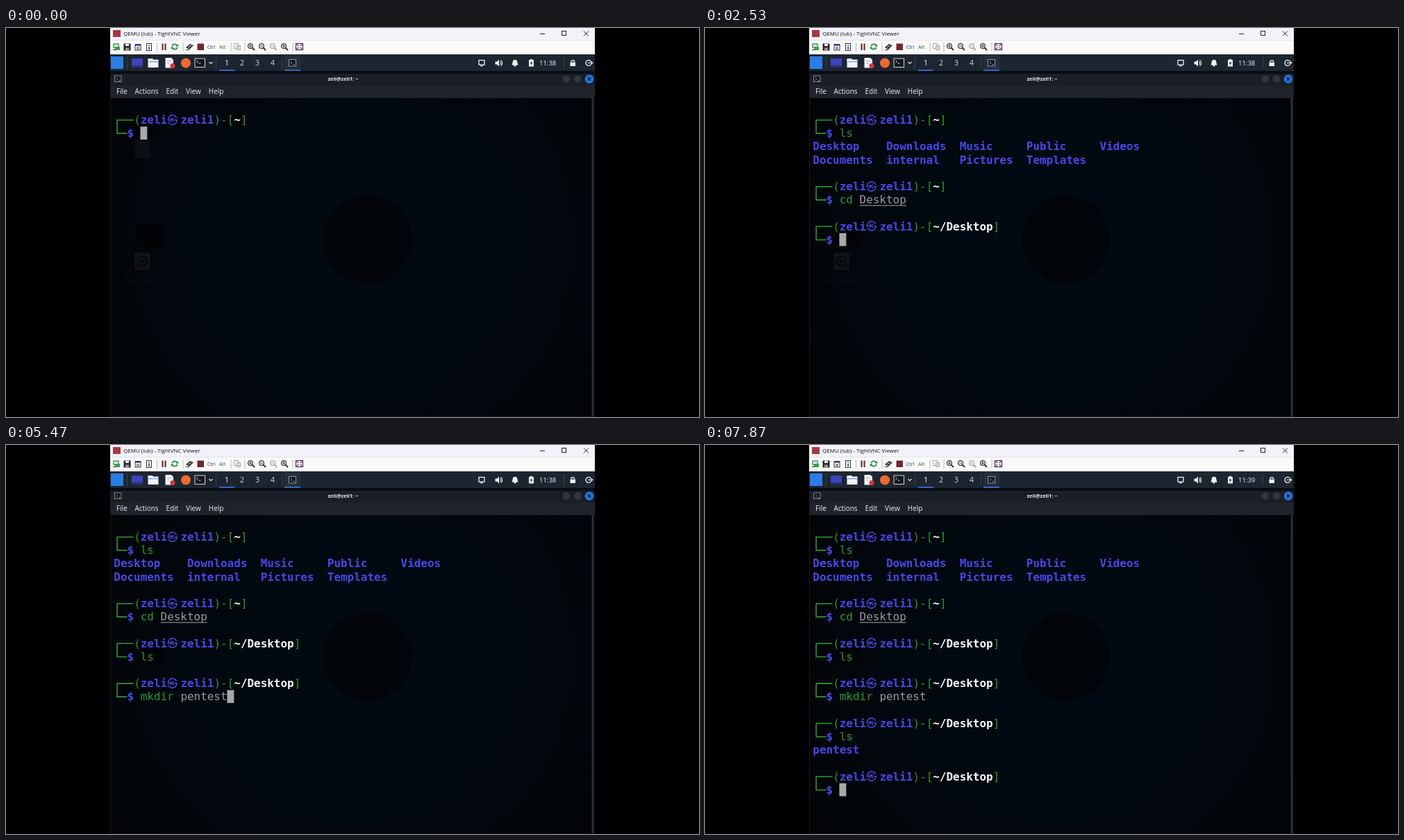
An HTML page with a canvas for the animation above (8000 ms loop, 998 px wide and 561 px high).

```html
<!DOCTYPE html>
<html lang="en">
<head>
<meta charset="utf-8">
<title>Terminal session</title>
<style>
html, body { margin: 0; width: 100%; height: 100%; overflow: hidden; background: #000; }
canvas { display: block; }
</style>
</head>
<body>
<canvas id="stage" width="998" height="561"></canvas>
<script>
const ctx = document.getElementById('stage').getContext('2d');
const LOOP = 8000;
const UI = '"Open Sans", "Noto Sans", sans-serif';
const MONO = '"DejaVu Sans Mono", monospace';
const CJK = '"Noto Sans CJK KR", "Noto Sans CJK JP", "Noto Sans CJK", sans-serif';
const USER = 'zeli', HOST = 'zeli1';

// Terminal grid
const X0 = 155.3, Y0 = 138, CELL = 9.61, ROW = 19.2;
const GREEN = '#2b9a30', BLUE = '#4a47ea', GRAY = '#979b9f', WHITE = '#fbfbfb', CURSOR = '#a6a8aa';

// Wallpaper glow seen through the terminal
const glow = ctx.createRadialGradient(500, 305, 120, 500, 305, 420);
glow.addColorStop(0, '#010a12');
glow.addColorStop(.5, '#01070d');
glow.addColorStop(1, '#020407');

// keys: typing times; accept: time the suggestion is taken; enter: time it runs
const session = [
  { dir: '~', cmd: 'ls', keys: [270, 400], enter: 600, out: [
    [[0, 'Desktop'], [11, 'Downloads'], [22, 'Music'], [32, 'Public'], [43, 'Videos']],
    [[0, 'Documents'], [11, 'internal'], [22, 'Pictures'], [32, 'Templates']]] },
  { dir: '~', cmd: 'cd Desktop', keys: [870, 1000, 1070, 1200], accept: 1600, enter: 2070, path: true, out: [] },
  { dir: '~/Desktop', cmd: 'ls', keys: [2800, 2930], enter: 3200, out: [] },
  { dir: '~/Desktop', cmd: 'mkdir pentest', keys: [4070, 4200, 4330, 4460, 4600, 4800, 4930], accept: 5270, enter: 5800, out: [] },
  { dir: '~/Desktop', cmd: 'ls', keys: [6730, 6870], enter: 7200, out: [[[0, 'pentest']]] },
  { dir: '~/Desktop', cmd: '', keys: [], enter: Infinity, out: [] }
];

function rect(x, y, w, h, color) {
  ctx.fillStyle = color;
  ctx.fillRect(x, y, w, h);
}
function frame(x, y, w, h, color, lw = 1) {
  ctx.strokeStyle = color;
  ctx.lineWidth = lw;
  ctx.strokeRect(x, y, w, h);
}
function disc(x, y, r, color) {
  ctx.fillStyle = color;
  ctx.beginPath();
  ctx.arc(x, y, r, 0, 7);
  ctx.fill();
}
function ring(x, y, r, color, lw = 1, a = 0, b = Math.PI * 2) {
  ctx.strokeStyle = color;
  ctx.lineWidth = lw;
  ctx.beginPath();
  ctx.arc(x, y, r, a, b);
  ctx.stroke();
}
function line(color, lw, ...p) {
  ctx.strokeStyle = color;
  ctx.lineWidth = lw;
  ctx.beginPath();
  for (let i = 0; i < p.length; i += 2) ctx.lineTo(p[i], p[i + 1]);
  ctx.stroke();
}
function poly(color, ...p) {
  ctx.fillStyle = color;
  ctx.beginPath();
  for (let i = 0; i < p.length; i += 2) ctx.lineTo(p[i], p[i + 1]);
  ctx.fill();
}
function label(str, x, y, font, color, align = 'left') {
  ctx.font = font;
  ctx.fillStyle = color;
  ctx.textAlign = align;
  ctx.fillText(str, x, y);
}
const px = col => X0 + col * CELL;
const py = row => Y0 + row * ROW;
function mono(str, col, row, color, bold) {
  label(str, px(col), py(row), (bold ? 'bold ' : '') + '15.95px ' + MONO, color);
}

function drawTitleBar() {
  rect(150, 0, 698, 17, '#f3f2fb');
  rect(154, 3, 11, 10, '#a33b40');
  label('QEMU (lub) - TightVNC Viewer', 169, 11, '8px ' + UI, '#111116');
  line('#222', 1, 769, 8.5, 776, 8.5);
  frame(800.5, 4.5, 6, 6, '#222');
  line('#222', 1, 832, 4.5, 839, 11.5);
  line('#222', 1, 839, 4.5, 832, 11.5);
}

function magnifier(x, color, mark) {
  ring(x - 1, 26, 3.4, color, 1.2);
  line(color, 2, x + 1.5, 28.5, x + 5, 32);
  line(color, 1, x - 3, 26, x + 1, 26);
  if (mark === '+') line(color, 1, x - 1, 24, x - 1, 28);
}

function drawToolbar() {
  rect(150, 17, 698, 21, '#fafafa');
  rect(150, 17, 698, 1, '#e2e2e6');
  for (const x of [217, 254.5, 323.5, 343.5, 412.5]) rect(x, 21, 1, 13, '#b9b9b9');

  frame(155, 23, 7, 5, '#268a35', 1.3);
  rect(157, 27, 7, 5, '#34a143');
  line('#222', 1, 154, 31.5, 158, 31.5);

  rect(169.5, 22.5, 10, 10, '#262626');
  rect(172, 23, 5, 3, '#eee');
  rect(172, 28.5, 5, 4, '#999');

  frame(186, 24, 8, 8, '#333');
  rect(186, 23, 8, 2.5, '#26358f');
  line('#333', 1, 188, 28, 192, 28);
  line('#333', 1, 188, 30, 192, 30);
  frame(202.5, 22.5, 7, 10, '#333');
  rect(205.3, 24.5, 1.6, 1.6, '#26358f');
  rect(205.3, 27, 1.6, 4, '#26358f');

  rect(224.5, 22.5, 2, 9.5, '#641b20');
  rect(228.5, 22.5, 2, 9.5, '#641b20');

  ring(243, 27, 3.7, '#168c2a', 1.7, 3.3, 5.9);
  ring(243, 27, 3.7, '#168c2a', 1.7, .2, 2.8);
  poly('#168c2a', 245, 26.5, 249, 26.5, 247, 23);
  poly('#168c2a', 237, 27.5, 241, 27.5, 239, 31);

  poly('#333', 259, 28, 265, 23, 270, 25, 264, 31);
  line('#ddd', 1, 262, 28, 267, 25);
  line('#333', 1, 259, 31.5, 264, 31.5);
  rect(275.5, 22.5, 9.5, 9.5, '#70262c');
  label('Ctrl', 289.8, 30, '7px ' + UI, '#24248c');
  label('Alt', 307, 30, '7.5px ' + UI, '#147522');

  frame(328.5, 22.5, 6, 7, '#aaa');
  rect(332, 25, 6, 7, '#d8d8d8');
  frame(332.5, 25.5, 5, 6, '#aaa');

  magnifier(353, '#333', '+');
  magnifier(369, '#333', '-');
  magnifier(385, '#a5a5a5', '-');
  magnifier(401, '#333', '+');

  frame(417.5, 22.5, 10, 9, '#27317f', 1.2);
  line('#b32334', 1.4, 418.5, 23.5, 426.5, 30.5);
  line('#b32334', 1.4, 426.5, 23.5, 418.5, 30.5);
  rect(421, 25.5, 3, 3, '#fafafa');
}

function prompt(x, y, w, h, color) {
  rect(x, y, w, h, '#12161d');
  frame(x + .5, y + .5, w - 1, h - 1, color);
  line(color, 1, x + 3, y + 3, x + 5, y + 5, x + 3, y + 7);
  line(color, 1, x + 6, y + 7.5, x + 9, y + 7.5);
}

function drawPanel(t) {
  rect(150, 38, 698, 24, '#1d2630');
  rect(151, 41, 18, 18, '#2b7de5');
  for (const x of [174, 302, 397, 803]) rect(x, 42, 1, 17, '#3a404b');

  rect(181, 44, 16, 12.5, '#3f43bd');
  rect(181, 54, 16, 2.5, '#2b2f6d');
  rect(204.5, 44, 7, 4, '#dfe7f2');
  rect(204.5, 45.5, 15, 11.5, '#f0f4fa');
  rect(204.5, 48, 15, 1.2, '#6a9ae0');
  poly('#f3f3f5', 229.5, 43, 238, 43, 241, 46, 241, 57.5, 229.5, 57.5);
  line('#b4b4ba', 1, 232, 47.5, 238, 47.5);
  line('#b4b4ba', 1, 232, 50.5, 236, 50.5);
  disc(240, 54.5, 3.6, '#d9343d');
  disc(259, 50.5, 7, '#ec6b30');
  prompt(271.5, 43.5, 15.5, 13.5, '#d4d7da');
  line('#e4e4e4', 1.2, 292.5, 49, 295, 51.5, 297.5, 49);

  rect(307, 60, 22, 2, '#2d68c6');
  ['1', '2', '3', '4'].forEach((s, i) =>
    label(s, 318 + i * 22, 54, '10.5px ' + UI, i ? '#d5d8dc' : '#fff', 'center'));
  rect(401, 39, 23, 21, '#252e39');
  rect(401, 60, 23, 2, '#2d68c6');
  prompt(407, 45, 11, 10.5, '#929aa4');

  const ink = '#f0f2f4';
  frame(681, 46.5, 8, 6.5, ink, 1.3);
  rect(683, 54, 4, 1.2, ink);
  poly(ink, 704.5, 48.5, 707, 48.5, 710, 45.5, 710, 55.5, 707, 52.5, 704.5, 52.5);
  ring(710, 50.5, 2.7, ink, 1.1, -1, 1);
  ring(710, 50.5, 4.7, ink, 1.1, -1, 1);
  disc(733, 49, 3.2, ink);
  poly(ink, 729.8, 49, 736.2, 49, 737.5, 53.5, 728.5, 53.5);
  disc(733, 54.2, 1.4, ink);
  rect(753, 46, 7, 9.5, ink);
  rect(755, 44.8, 3, 1.5, ink);
  poly('#1d2630', 757.5, 47, 754.5, 51.3, 756.5, 51.3, 755.5, 54.5, 758.5, 50, 756.5, 50);
  label(t < 5500 ? '11:38' : '11:39', 768, 53.8, '9.5px ' + UI, ink);
  rect(812.5, 49.5, 7.5, 5.5, ink);
  ring(816.2, 49, 2.4, ink, 1.3, Math.PI, 0);
  ring(839, 50.3, 4, ink, 1.3, .6, 5.6);
  line(ink, 1.2, 838, 50.3, 844.5, 50.3);
  line(ink, 1.2, 842.3, 48, 844.7, 50.3, 842.3, 52.6);
}

function drawGhostIcons(t) {
  rect(188, 283, 37, 33, '#010306');
  if (t < 600) {
    rect(186, 163, 21, 25, '#0c0f13');
    rect(184.5, 161.5, 24, 3, '#0c0f13');
  }
  if (t < 3200) {
    rect(185, 324, 23, 25, '#101215');
    ring(196.5, 336.5, 6.5, '#030507', 1.5);
    disc(196.5, 336.5, 2, '#030507');
    label('File System', 195.5, 369, '9px ' + UI, '#0d1013', 'center');
  }
}

function drawWindow(t) {
  rect(150, 62, 698, 4, '#080d14');
  rect(151, 66, 697, 17, '#191e27');
  rect(151, 83, 697, 18, '#1f232c');
  prompt(156, 68.5, 10.5, 9.5, '#868c94');
  label(USER + '@' + HOST + ': ~', 485.5, 76, 'bold 7.4px ' + UI, '#eceef0', 'center');
  disc(807, 73.5, 5.3, '#30353f');
  disc(823.3, 73.5, 5.3, '#30353f');
  disc(840, 73.5, 6.3, '#2474de');
  line('#0c1a33', 1.3, 837.7, 71.2, 842.3, 75.8);
  line('#0c1a33', 1.3, 842.3, 71.2, 837.7, 75.8);
  [['File', 159], ['Actions', 185.5], ['Edit', 230.5], ['View', 259], ['Help', 291.8]]
    .forEach(([s, x]) => label(s, x, 95, '10px ' + UI, '#f0f1f2'));

  rect(150, 101, 698, 460, glow);
  disc(520, 305, 64, '#010509');
  drawGhostIcons(t);
  rect(843.5, 101, 3, 459, '#29303a');
  rect(150, 66, 1, 495, '#161b23');
  rect(150, 560, 698, 1, '#10161d');
}

function drawPrompt(dir, row) {
  const top = py(row) - 5.3, bottom = top + ROW, x = px(.5);
  line(GREEN, 1.6, px(3) - .5, top, x, top, x, bottom, px(2), bottom);
  mono('(', 3, row, GREEN);
  mono(USER, 4, row, BLUE, true);
  label('㉿', px(8.8), py(row) - .5, 'bold 15px ' + CJK, BLUE, 'center');
  mono(HOST, 10, row, BLUE, true);
  mono(')-[', 15, row, GREEN);
  mono(dir, 18, row, WHITE, true);
  mono(']', 18 + dir.length, row, GREEN);
  mono('$', 2, row + 1, BLUE, true);
}

function underline(col, n, row) {
  rect(px(col), py(row) + 2.2, n * CELL, 1.1, GRAY);
}

function drawCommand(step, row, t) {
  const { cmd, keys, accept, enter, path } = step;
  const typed = t >= accept ? cmd.length : keys.filter(k => k <= t).length;
  const word = cmd.split(' ')[0].length;
  const known = typed >= word;
  const head = cmd.slice(0, Math.min(typed, word));
  mono(head, 4, row, known ? GREEN : GRAY);
  if (!known) underline(4, typed, row);
  if (typed) mono(cmd.slice(head.length), 4 + head.length, row, GRAY);
  if (path && typed > word + 1) underline(5 + word, typed - word - 1, row);

  if (t < enter) {
    rect(px(4 + typed) - .3, py(row) - 15, CELL + .3, 18.7, CURSOR);
    if (typed) mono(cmd[typed] || '', 4 + typed, row, '#2a2f34');
  }
}

function drawSession(t) {
  let row = 0;
  for (const step of session) {
    drawPrompt(step.dir, row);
    drawCommand(step, row + 1, t);
    if (t < step.enter) break;
    row += 2;
    for (const items of step.out) {
      items.forEach(([col, name]) => mono(name, col, row, BLUE, true));
      row++;
    }
    row++;
  }
}

function draw(now) {
  const t = now % LOOP;
  rect(0, 0, 998, 561, '#000');
  drawTitleBar();
  drawToolbar();
  drawPanel(t);
  drawWindow(t);
  drawSession(t);
  requestAnimationFrame(draw);
}
requestAnimationFrame(draw);
</script>
</body>
</html>
```
